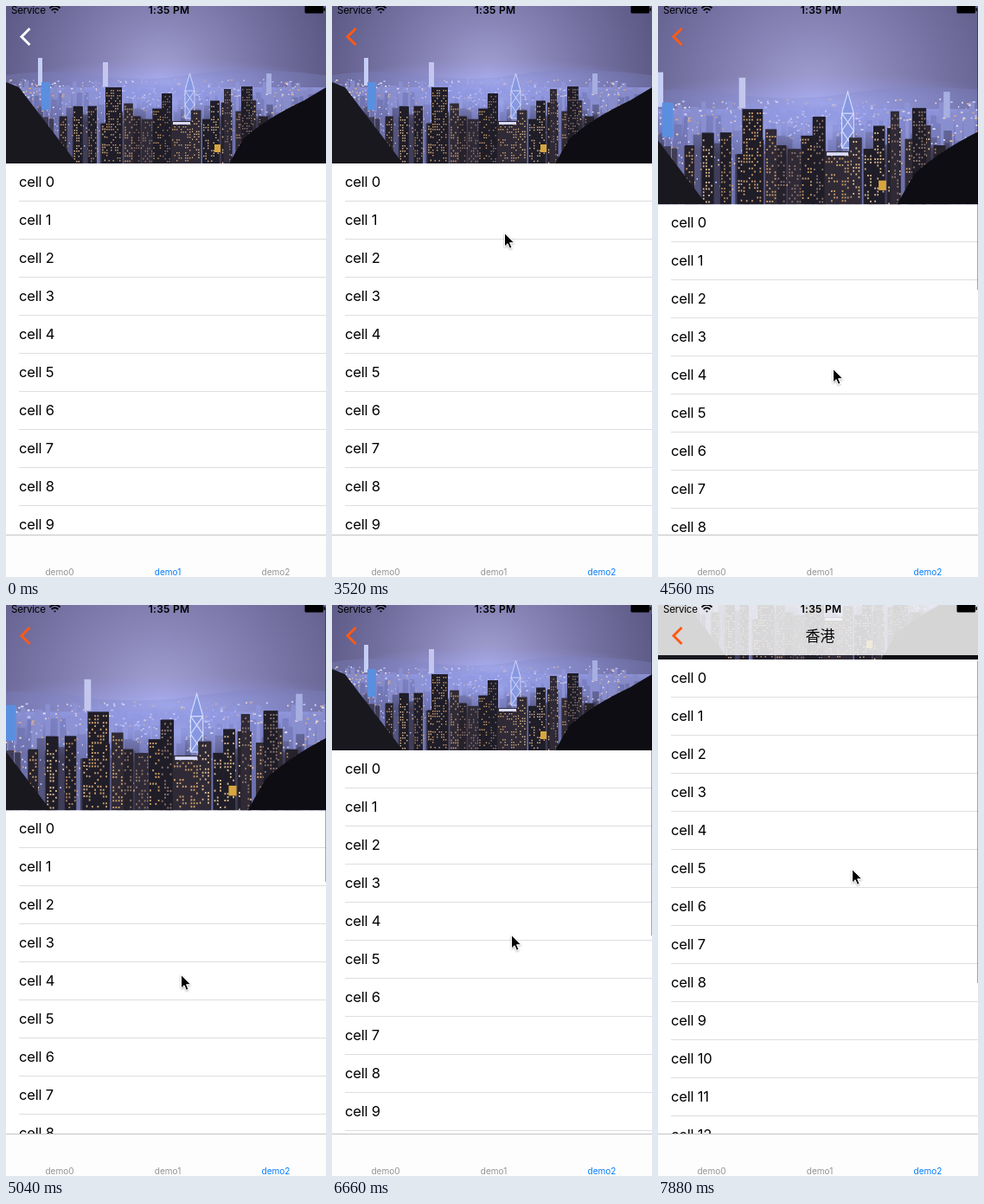
An HTML page for the animation above (8 s loop, 370 by 660 pixels).

```html
<!DOCTYPE html>
<html lang="en">
<head>
<meta charset="utf-8">
<title>List with stretching header</title>
<style>
html, body { margin: 0; width: 100%; height: 100%; overflow: hidden; background: #fff; }
svg { display: block; width: 370px; height: 660px; font-family: Inter, Roboto, sans-serif; }
#rows text { font-size: 16.5px; letter-spacing: -.2px; }
#tabs text { font-size: 10px; text-anchor: middle; }
</style>
</head>
<body>
<svg viewBox="0 0 370 660">
  <defs>
    <radialGradient id="sky" gradientUnits="userSpaceOnUse" cx="180" cy="85" r="215">
      <stop offset="0" stop-color="#a6a3d6"/>
      <stop offset=".3" stop-color="#8a86b8"/>
      <stop offset=".6" stop-color="#726e9e"/>
      <stop offset="1" stop-color="#57547f"/>
    </radialGradient>
    <linearGradient id="ground" x2="0" y2="1">
      <stop offset="0" stop-color="#8d92d4"/>
      <stop offset=".3" stop-color="#676ca6"/>
      <stop offset=".6" stop-color="#3b3a55"/>
      <stop offset="1" stop-color="#242029"/>
    </linearGradient>
    <radialGradient id="haze">
      <stop offset="0" stop-color="#aab4ff" stop-opacity=".6"/>
      <stop offset="1" stop-color="#8f98ee" stop-opacity="0"/>
    </radialGradient>
    <clipPath id="photoClip"><rect y="-6" width="370" height="188"/></clipPath>
    <filter id="shade" x="-50%" y="-50%" width="200%" height="200%">
      <feDropShadow dx="0" dy="1" stdDeviation="1" flood-opacity=".35"/>
    </filter>
  </defs>
  <rect width="370" height="660" fill="#fff"/>
  <g id="rows"></g>
  <g id="photo"><g id="city" clip-path="url(#photoClip)"></g></g>
  <rect id="scroller" x="369" width="1" fill="#000" fill-opacity=".35"/>
  <g id="bar">
    <rect width="370" height="58" fill="#f6f6f6"/>
    <text x="187.5" y="42" font-size="17" text-anchor="middle" font-family="'Noto Sans CJK SC', 'Noto Sans CJK JP', 'Noto Sans CJK', sans-serif" font-weight="500">香港</text>
  </g>
  <path id="back" d="M27.5 26L18 35.5L27.5 45" fill="none" stroke-width="3"/>
  <g id="status">
    <text x="6" y="8.5" font-size="11.5" letter-spacing="-.2">Service</text>
    <g fill="none" stroke="#000" stroke-width="1.7">
      <path d="M50.5 2.5Q56.5 -3 62.5 2.5M52.7 5Q56.5 1.5 60.3 5"/>
      <path d="M55 7L56.5 8.5L58 7Q56.5 5.8 55 7Z" fill="#000" stroke="none"/>
    </g>
    <text x="188.500" y="8.5" font-size="12" font-weight="600" letter-spacing=".25" text-anchor="middle">1:35 PM</text>
    <rect x="345.5" y="-1" width="21.500" height="9.500" rx="1.5"/>
    <rect x="367.5" y="2" width="1.5" height="4" rx=".7"/>
  </g>
  <g id="tabs">
    <rect y="611" width="370" height="49" fill="#fdfdfd"/>
    <rect y="611" width="370" height="1" fill="#c4c4c6"/>
  </g>
  <path id="cursor" d="M0 0V15.500L3.600 12.200L6 17.800L8.500 16.700L6.100 11.200H11.200Z" stroke="#fff" filter="url(#shade)"/>
</svg>
<script>
const LOOP = 8000, HEADER = 181, ROW = 44, TAB_SWITCH = 1030, PULL = 55, LIFT = 119;
const $ = id => document.getElementById(id);

function add(parent, tag, attrs, text) {
  const el = document.createElementNS('http://www.w3.org/2000/svg', tag);
  for (const k in attrs) el.setAttribute(k, attrs[k]);
  if (text) el.textContent = text;
  return parent.appendChild(el);
}

let seed = 29;
const random = () => (seed = (seed * 16807) % 2147483647) / 2147483647;
const between = (a, b) => a + (b - a) * random();
const pick = list => list[Math.floor(random() * list.length)];

const block = (x, y, width, height, fill) => add($('city'), 'rect', { x, y, width, height, fill });
const shape = (d, fill, more) => add($('city'), 'path', { d, fill, ...more });

// Scatters small lights, one path per colour.
function lights(count, colors, top, bottom, size) {
  for (const color of colors) {
    let d = '';
    for (let i = 0; i < count / colors.length; i++) {
      const w = between(.7, size).toFixed(1);
      d += `M${between(0, 340).toFixed(1)} ${between(top, bottom).toFixed(1)}h${w}v1.4h-${w}z`;
    }
    shape(d, color);
  }
}

// A dark tower with a grid of randomly lit windows.
function tower(x, y, w) {
  block(x, y, w, 182 - y, pick(['#26222c', '#2f2a36', '#1f1d28']));
  let d = '';
  for (let wy = y + 3; wy < 181; wy += 3)
    for (let wx = x + 1; wx < x + w - 1; wx += 2.5)
      if (random() < .4) d += `M${wx.toFixed(1)} ${wy.toFixed(1)}h1.4v1.6h-1.4z`;
  shape(d, pick(['#a98058', '#c99a66', '#8c7368', '#d8b68c']));
}

function buildCity() {
  block(0, -6, 370, 188, 'url(#sky)');
  shape('M0 80Q50 72 105 80T210 80T300 74T370 80V96H0Z', '#777bb3', { opacity: .45 });
  block(0, 94, 370, 88, 'url(#ground)');

  // Rows of buildings, from the hazy shore to the dark foreground
  const tints = ['#8589c4', '#6d71ab', '#54557f', '#3f3d58'];
  tints.forEach((tint, row) => {
    for (let x = between(0, 5); x < 350; x += between(5, 10 + row)) {
      const y = between(86, 98) + row * 13;
      block(x, y, between(3, 7 + row), 182 - y, random() < .7 ? tint : tints[Math.max(0, row - 1)]);
    }
    lights(170, ['#f4f1ff', '#c3c9ff', '#ffe2bb', '#dba878'], 84 + row * 16, 106 + row * 22, 3 - row * .4);
  });
  for (const y of [88, 112])
    add($('city'), 'ellipse', { cx: 190, cy: y, rx: 180, ry: 28, fill: 'url(#haze)' });

  // Bright landmarks
  block(37, 60, 5, 32, '#c5cef5');
  block(112, 65, 6, 28, '#c3c7ed');
  block(301, 78, 6, 24, '#a7aee0');
  block(41, 88, 10, 32, '#5a8fe0');
  shape('M207 98L212.500 78L218 98V130H207ZM207 98L218 114L207 130M218 98L207 114L218 130M207 98H218',
    '#8798e0', { stroke: '#d5deff', 'stroke-width': .9 });

  for (let x = 62; x < 300; x += between(9, 17)) tower(x, between(108, 142), between(7, 13));
  tower(115, 94, 19);
  tower(180, 101, 12);
  tower(252, 96, 8);
  tower(272, 93, 13);
  tower(191, 133, 24);
  block(193, 134, 20, 3, '#d9dcff');
  block(241, 160, 7, 9, '#d8a63c');

  // Foreground roof and hill
  shape('M0 88L15 94L82 182H0Z', '#19181f');
  shape('M370 94L345 109Q300 130 274 154L258 182H370Z', '#0e0d13');
}

function buildRows() {
  for (let i = 0; i < 14; i++) {
    const y = HEADER + i * ROW;
    add($('rows'), 'text', { x: 15, y: y + 28 }, 'cell ' + i);
    add($('rows'), 'rect', { x: 15, y: y + ROW, width: 355, height: 1, fill: '#dedde0' });
  }
}

buildCity();
buildRows();
const tabs = [0, 1, 2].map(i => add($('tabs'), 'text', { x: 62 + 125 * i, y: 657.5 }, 'demo' + i));

// The picture moves in bursts of even steps: start, number of steps
const STEP = 148;
const bursts = [[450, 6], [1630, 8], [2930, 5], [3820, 7], [4890, 8], [6510, 8], [7730, 2]];

function stepTime(t) {
  const burst = bursts.filter(([start]) => start <= t).pop();
  if (!burst) return 0;
  const [start, count] = burst;
  return start + STEP * Math.min(count - 1, Math.floor((t - start + 6) / STEP));
}

const progress = (t, start, end) => Math.min(1, Math.max(0, (t - start) / (end - start)));
const easeOut = u => 1 - (1 - u) ** 2;
const snap = v => Math.round(v * 2) / 2;

// Stops of the pointer: time, x, y
const stops = [[450, 329, 586], [1030, 301, 641], [1630, 301, 641], [2660, 211, 230], [3225, 203, 303],
  [3520, 199, 262], [4560, 202, 419], [5480, 202, 434], [6660, 207, 381], [7880, 224, 305]];

function pointerAt(t) {
  const next = Math.max(1, stops.findIndex(stop => stop[0] >= t));
  const [t0, x0, y0] = stops[next - 1], [t1, x1, y1] = stops[next];
  const u = progress(t, t0, t1);
  return [x0 + (x1 - x0) * u, y0 + (y1 - y0) * u].map(v => Math.round(v) + .5);
}

function render(time) {
  const t = stepTime(time);
  const pull = snap(PULL * easeOut(progress(t, 3700, 5100)) * (1 - easeOut(progress(t, 5200, 5920))));
  const up = snap(LIFT * progress(t, 6495, 7880));

  const zoom = 1 + pull / (HEADER + 6);
  $('photo').setAttribute('transform', `translate(185 ${-6 - up}) scale(${zoom}) translate(-185 6)`);
  $('rows').setAttribute('transform', `translate(0 ${pull - up})`);
  $('bar').setAttribute('opacity', progress(up, 14, 136));

  $('scroller').setAttribute('y', 3 + .52 * up);
  $('scroller').setAttribute('height', 372 - pull);
  $('scroller').setAttribute('opacity', (time >= 3820 && time < 6070) || time >= 6510 ? 1 : 0);

  const selected = t < TAB_SWITCH ? 1 : 2;
  tabs.forEach((tab, i) => tab.setAttribute('fill', i === selected ? '#007aff' : '#929292'));
  $('back').setAttribute('stroke', selected === 1 ? '#fff' : '#ff5a14');

  $('cursor').setAttribute('visibility', t < 450 ? 'hidden' : 'visible');
  $('cursor').setAttribute('transform', `translate(${pointerAt(t)})`);
}

const begin = performance.now();
function tick() {
  render((performance.now() - begin) % LOOP);
  requestAnimationFrame(tick);
}
tick();
</script>
</body>
</html>
```
